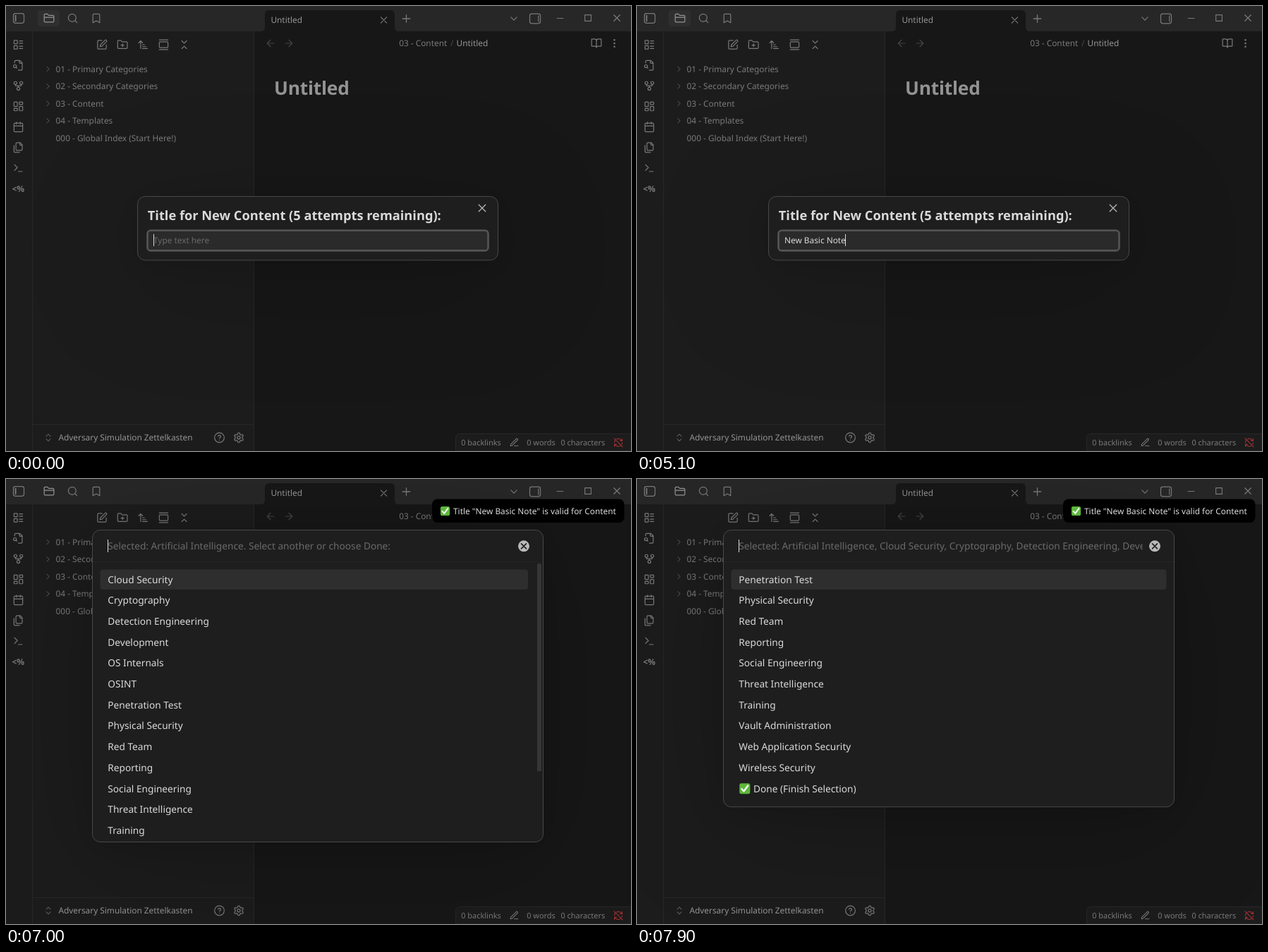
An HTML page for the animation above (8000 ms loop, 886x632 px).

```html
<!DOCTYPE html>
<html lang="en">
<head>
<meta charset="utf-8">
<title>Note vault</title>
<style>
  html, body { margin: 0; width: 100%; height: 100%; overflow: hidden; background: #1e1e1e; }
  svg { display: block; }
  text { font: 11.85px "Noto Sans", sans-serif; fill: #dadada; white-space: pre; text-rendering: geometricPrecision; }
  .muted { fill: #b3b3b3; }
  .faint { fill: #6a6a6a; }
  .status { font-size: 10.94px; fill: #b3b3b3; }
  .large { font-size: 13.68px; }
  .vault { font-weight: 500; }
  .heading { font-weight: 700; font-size: 26.3px; letter-spacing: -.2px; }
  .question { font-weight: 600; font-size: 18.24px; }
  .code { font-weight: 600; font-size: 12px; fill: #b3b3b3; }
  .line { stroke: #363636; fill: none; }
  .icon { fill: none; stroke: #b3b3b3; stroke-width: 1.75; stroke-linecap: round; stroke-linejoin: round; }
  .panel { fill: #1e1e1e; stroke: #484848;
    filter: drop-shadow(0 6px 22px rgba(0,0,0,.11)) drop-shadow(0 27px 82px rgba(0,0,0,.2)); }
</style>
</head>
<body>
<svg id="stage" width="886" height="632" viewBox="0 0 886 632" xmlns="http://www.w3.org/2000/svg"></svg>
<script>
const circle = (x, y, r) => `M${x - r} ${y}a${r} ${r} 0 1 0 ${2 * r} 0a${r} ${r} 0 1 0 ${-2 * r} 0`;
const box = (x, y, w, h, r = 1) =>
  `M${x + r} ${y}h${w - 2 * r}a${r} ${r} 0 0 1 ${r} ${r}v${h - 2 * r}a${r} ${r} 0 0 1 ${-r} ${r}` +
  `h${2 * r - w}a${r} ${r} 0 0 1 ${-r} ${-r}v${2 * r - h}a${r} ${r} 0 0 1 ${r} ${-r}z`;
const gear = 'M' + Array.from({ length: 72 }, (_, i) => {
  const a = i * Math.PI / 36, r = 8.5 + 1.5 * Math.tanh(2 * Math.cos(6 * a));
  return `${(12 + r * Math.sin(a)).toFixed(2)} ${(12 - r * Math.cos(a)).toFixed(2)}`;
}).join('L') + 'z';
const folder = 'M20 20a2 2 0 0 0 2-2V8a2 2 0 0 0-2-2h-7.9a2 2 0 0 1-1.7-.9L9.6 3.9A2 2 0 0 0 7.9 3H4a2 2 0 0 0-2 2v13a2 2 0 0 0 2 2Z';

// Icon outlines on a 24 unit grid
const icons = {
  panelLeft: box(1, 2, 22, 20, 4) + 'M5 6v12M6 6v12',
  panelRight: box(1, 2, 22, 20, 4) + 'M19 6v12',
  folder: folder + 'M2 10h20',
  folderPlus: folder + 'M12 10v6M9 13h6',
  search: circle(11, 11, 8) + 'M21 21l-4.3-4.3',
  bookmark: 'M19 21l-7-4-7 4V5a2 2 0 0 1 2-2h10a2 2 0 0 1 2 2z',
  close: 'M18 6L6 18M6 6l12 12',
  plus: 'M5 12h14M12 5v14',
  chevronDown: 'M6 9l6 6 6-6',
  chevronRight: 'M9 18l6-6-6-6',
  minimize: 'M5 12h14',
  maximize: 'M5 5h14v14H5z',
  list: box(3, 3, 7, 7) + box(3, 14, 7, 7) + 'M14 4h7M14 9h7M14 15h7M14 20h7',
  fileSearch: 'M14 2v4a2 2 0 0 0 2 2h4M4.3 7V4a2 2 0 0 1 2-2H15l5 5v13a2 2 0 0 1-2 2h-6' + circle(5, 14, 3) + 'M9 18l-1.5-1.5',
  fork: circle(12, 18, 3) + circle(6, 6, 3) + circle(18, 6, 3) + 'M18 9v2c0 .6-.4 1-1 1H7c-.6 0-1-.4-1-1V9M12 12v3',
  dashboard: box(3, 3, 7, 9) + box(14, 3, 7, 5) + box(14, 12, 7, 9) + box(3, 16, 7, 5),
  calendar: box(3, 4, 18, 18, 2) + 'M8 2v4M16 2v4M3 10h18',
  files: 'M20 7h-3a2 2 0 0 1-2-2V2M9 18a2 2 0 0 1-2-2V4a2 2 0 0 1 2-2h7l4 4v10a2 2 0 0 1-2 2ZM3 7.6v12.8A1.6 1.6 0 0 0 4.6 22h9.8',
  terminal: 'M4 17l6-6-6-6M12 19h8',
  edit: 'M12 3H5a2 2 0 0 0-2 2v14a2 2 0 0 0 2 2h14a2 2 0 0 0 2-2v-7M18.4 2.6a2.1 2.1 0 0 1 3 3L12 15l-4 1 1-4Z',
  sort: 'M3 8l4-4 4 4M7 4v16M11 12h4M11 16h7M11 20h10',
  gallery: 'M3 2h18M3 22h18' + box(3, 6, 18, 12, 2),
  collapse: 'M7 20l5-5 5 5M7 4l5 5 5-5',
  upDown: 'M7 15l5 5 5-5M7 9l5-5 5 5',
  help: circle(12, 12, 10) + 'M9.1 9a3 3 0 0 1 5.8 1c0 2-3 3-3 3M12 17h.01',
  settings: gear + circle(12, 12, 3),
  back: 'M12 19l-7-7 7-7M19 12H5',
  forward: 'M5 12h14M12 5l7 7-7 7',
  book: 'M12 7v14M3 18a1 1 0 0 1-1-1V4a1 1 0 0 1 1-1h5a4 4 0 0 1 4 4 4 4 0 0 1 4-4h5a1 1 0 0 1 1 1v13a1 1 0 0 1-1 1h-6a3 3 0 0 0-3 3 3 3 0 0 0-3-3z',
  more: circle(12, 5, 1) + circle(12, 12, 1) + circle(12, 19, 1),
  pen: 'M12 20h9M16.5 3.5a2.1 2.1 0 0 1 3 3L7 19l-4 1 1-4Z',
  syncOff: 'M21 8L18.7 5.7A9.75 9.75 0 0 0 12 3a9 9 0 0 0-4 1M8 16H3v5M3 12a9 9 0 0 1 2.2-5.9M3 16l2.3 2.3A9.75 9.75 0 0 0 12 21a9 9 0 0 0 5.9-2.2M21 12a9 9 0 0 1-1 4M21 3v5h-5M22 22L2 2'
};

const icon = (name, x, y, size = 16.4, attrs = '') =>
  `<path class="icon" d="${icons[name]}" transform="translate(${x - size / 2} ${y - size / 2}) scale(${size / 24})" ${attrs}/>`;
const label = (str, x, y, cls = '', id = '') => `<text x="${x}" y="${y}" class="${cls}" id="${id}">${str}</text>`;
const rect = (x, y, w, h, attrs, r = 0) => `<rect x="${x}" y="${y}" width="${w}" height="${h}" rx="${r}" ${attrs}/>`;
const tick = (x, y, size) => `<g transform="translate(${x} ${y}) scale(${size / 16})">
  ${rect(.5, .5, 15, 15, 'fill="#5cb83a"', 2.5)}
  <path d="M3.6 8.4l3 3.4 5.8-8" fill="none" stroke="#fff" stroke-width="2.3" stroke-linecap="round" stroke-linejoin="round"/></g>`;

const ribbon = ['list', 'fileSearch', 'fork', 'dashboard', 'calendar', 'files', 'terminal'];
const tools = ['edit', 'folderPlus', 'sort', 'gallery', 'collapse'];
const folders = ['01 - Primary Categories', '02 - Secondary Categories', '03 - Content', '04 - Templates'];

const workspace = `
  ${rect(0, 0, 886, 632, 'fill="#1e1e1e"')}
  ${rect(0, 36, 351, 596, 'fill="#262626"')}
  ${rect(0, 0, 886, 36, 'fill="#363636"')}
  <path class="line" d="M37.5 36V632M351.5 0V632M38 594.5H351"/>
  ${rect(45, 6, 31, 23, 'id="activeTab" fill="#434343"', 4)}
  ${icon('panelLeft', 18, 17.5)}${icon('folder', 61, 17.5, 16.4, 'style="stroke:#dadada"')}
  ${icon('search', 94.5, 17.5)}${icon('bookmark', 128, 17.5)}
  <path d="M361 36Q367 36 367 30V12Q367 6 373 6H545Q551 6 551 12V30Q551 36 557 36Z" fill="#1e1e1e"/>
  ${label('Untitled', 375.4, 24.3)}
  ${icon('close', 535.5, 20)}${icon('plus', 567.5, 18, 18)}
  ${icon('chevronDown', 720, 18)}${icon('panelRight', 750, 18)}
  ${icon('minimize', 785.5, 17.5, 15)}${icon('maximize', 825, 17, 15)}${icon('close', 866, 17, 17)}
  ${ribbon.map((name, i) => icon(name, 17.5, 55 + i * 29.2)).join('')}
  ${label('&lt;%', 8.5, 263.8, 'code')}
  ${tools.map((name, i) => icon(name, 136 + i * 29.15, 55)).join('')}
  ${folders.map((name, i) => icon('chevronRight', 59.5, 89.5 + i * 24.5, 13, 'opacity=".75"') +
    label(name, 70.6, 93.8 + i * 24.5, 'muted')).join('')}
  ${label('000 - Global Index (Start Here!)', 70.6, 191.8, 'muted')}
  ${icon('upDown', 60, 613, 14.5, 'opacity=".7"')}
  ${label('Adversary Simulation Zettelkasten', 74.5, 617.3, 'vault')}
  ${icon('help', 302.5, 613)}${icon('settings', 330, 613)}
  ${icon('back', 375, 53, 16.4, 'opacity=".45"')}${icon('forward', 401, 53, 16.4, 'opacity=".45"')}
  ${label('03 - Content', 557.2, 57.3, 'muted')}${label('/', 630, 57.3, 'faint')}${label('Untitled', 638.6, 57.3)}
  ${icon('book', 837, 53)}${icon('more', 862.5, 53)}
  ${label('Untitled', 380, 125.5, 'heading')}
  <path d="M637.5 632V614Q637.5 607.5 644 607.5H886V632Z" fill="#262626" stroke="#363636"/>
  ${label('0 backlinks', 645.2, 624, 'status')}${icon('pen', 720.5, 620, 14.5)}
  ${label('0 words', 738.2, 624, 'status')}${label('0 characters', 786.4, 624, 'status')}
  ${icon('syncOff', 868, 620, 14.5, 'style="stroke:#fb464c"')}`;

const titleDialog = `<g id="dialog">
  ${rect(186.5, 270.5, 511, 90.5, 'class="panel"', 11)}
  ${label('Title for New Content (5 attempts remaining):', 200.8, 304, 'question')}
  ${icon('close', 675, 287, 19)}
  ${rect(200.5, 318.8, 483, 28.6, 'fill="#2a2a2a" stroke="#555" stroke-width="2.6"', 4.5)}
  ${label('Type text here', 209, 337.3, 'faint', 'hint')}
  ${label('', 209, 337.3, '', 'typed')}
  ${rect(209, 324, 1, 17, 'id="dialogCaret" fill="#dadada"')}</g>`;

const picker = `<g id="picker">
  ${rect(122.5, 72.5, 639, 443, 'class="panel" id="pickerPanel"', 11)}
  <path d="M123 117.5H761" stroke="#242424"/>
  <g clip-path="url(#promptClip)">${label('', 144.3, 100.3, 'large faint', 'prompt')}</g>
  ${rect(144, 86, 1, 18, 'id="pickerCaret" fill="#dadada"')}
  <circle cx="734" cy="95.3" r="8" fill="#bababa"/>
  ${icon('close', 734, 95.3, 14, 'style="stroke:#1e1e1e;stroke-width:2.8"')}
  ${rect(133.5, 128.5, 607, 28.5, 'id="rowHighlight" fill="#2e2e2e"', 4)}
  <g id="rows"></g>
  ${rect(753, 120, 6, 295, 'id="thumb" fill="#363636"', 2)}</g>`;

const notice = `<g id="notice">
  ${rect(604, 28.5, 272.5, 33.5, 'fill="#000"', 7.5)}
  ${tick(615.5, 38.5, 14)}
  ${label('Title "New Basic Note" is valid for Content', 634, 49.8)}</g>`;

stage.innerHTML = `<defs><clipPath id="promptClip">${rect(144, 80, 573, 32, '')}</clipPath></defs>
  ${workspace}${rect(0, 0, 886, 632, 'id="dim" fill="#0a0a0a" opacity=".34"')}${titleDialog}${picker}${notice}`;

const $ = id => document.getElementById(id);
const show = (id, on) => $(id).setAttribute('visibility', on ? 'inherit' : 'hidden');
const set = (id, name, value) => $(id).setAttribute(name, value);
const countPast = (times, t) => times.filter(time => time <= t).length;

const LOOP = 8000, STEP = 100, CLOSE = 5700, OPEN = 5800;
const noteTitle = 'New Basic Note';
const keyTimes = [1300, 1500, 1600, 1800, 2500, 2900, 3000, 3200, 3300, 3500, 4200, 4600, 4900, 5100];
const pickTimes = [7000, 7200, 7400, 7500, 7600, 7700, 7900];
const categories = ['Artificial Intelligence', 'Cloud Security', 'Cryptography', 'Detection Engineering',
  'Development', 'OS Internals', 'OSINT', 'Penetration Test', 'Physical Security', 'Red Team', 'Reporting',
  'Social Engineering', 'Threat Intelligence', 'Training', 'Vault Administration',
  'Web Application Security', 'Wireless Security'];
const DONE = 'Done (Finish Selection)', ROW = 29.69, MAX_ROWS = 13;

function drawDialog(t) {
  const typed = countPast(keyTimes, t);
  const lastKey = typed ? keyTimes[typed - 1] : t < 1100 ? -100 : 1100;
  $('typed').textContent = noteTitle.slice(0, typed);
  show('hint', !typed);
  set('dialogCaret', 'x', Math.floor(209 + (typed ? $('typed').getComputedTextLength() : 0)));
  show('dialogCaret', t - lastKey < 600);
}

function drawPicker(t) {
  const picked = countPast(pickTimes, t);
  const rows = categories.slice(picked).concat(picked ? DONE : []);
  const scrolls = rows.length >= MAX_ROWS;
  $('prompt').textContent = picked
    ? `Selected: ${categories.slice(0, picked).join(', ')}. Select another or choose Done:`
    : 'Select PRIMARY category to link back to:';
  show('pickerCaret', t < 6400 || t >= 7000);
  $('rows').innerHTML = rows.slice(0, MAX_ROWS).map((name, i) => {
    const y = 147.6 + i * ROW;
    return name === DONE ? tick(144.8, y - 12.8, 16) + label(name, 165, y, 'large') : label(name, 144.3, y, 'large');
  }).join('');
  set('pickerPanel', 'height', scrolls ? 443 : 66.6 + rows.length * ROW);
  set('rowHighlight', 'width', scrolls ? 606.5 : 617);
  show('thumb', scrolls);
  set('thumb', 'height', 391.5 * 398 / (rows.length * ROW + 23));
}

let drawn = -1;
function frame() {
  const t = Math.floor(performance.now() % LOOP / STEP) * STEP;
  if (t !== drawn) {
    drawn = t;
    show('activeTab', t < CLOSE);
    show('dim', t < CLOSE || t >= OPEN);
    show('dialog', t < CLOSE);
    show('picker', t >= OPEN);
    show('notice', t >= CLOSE);
    const slide = Math.min(1, Math.max(0, (t - CLOSE) / 300));
    set('notice', 'transform', `translate(${350 * (1 - slide) ** 2.7} 0)`);
    if (t < CLOSE) drawDialog(t);
    else if (t >= OPEN) drawPicker(t);
  }
  requestAnimationFrame(frame);
}
frame();
</script>
</body>
</html>
```
